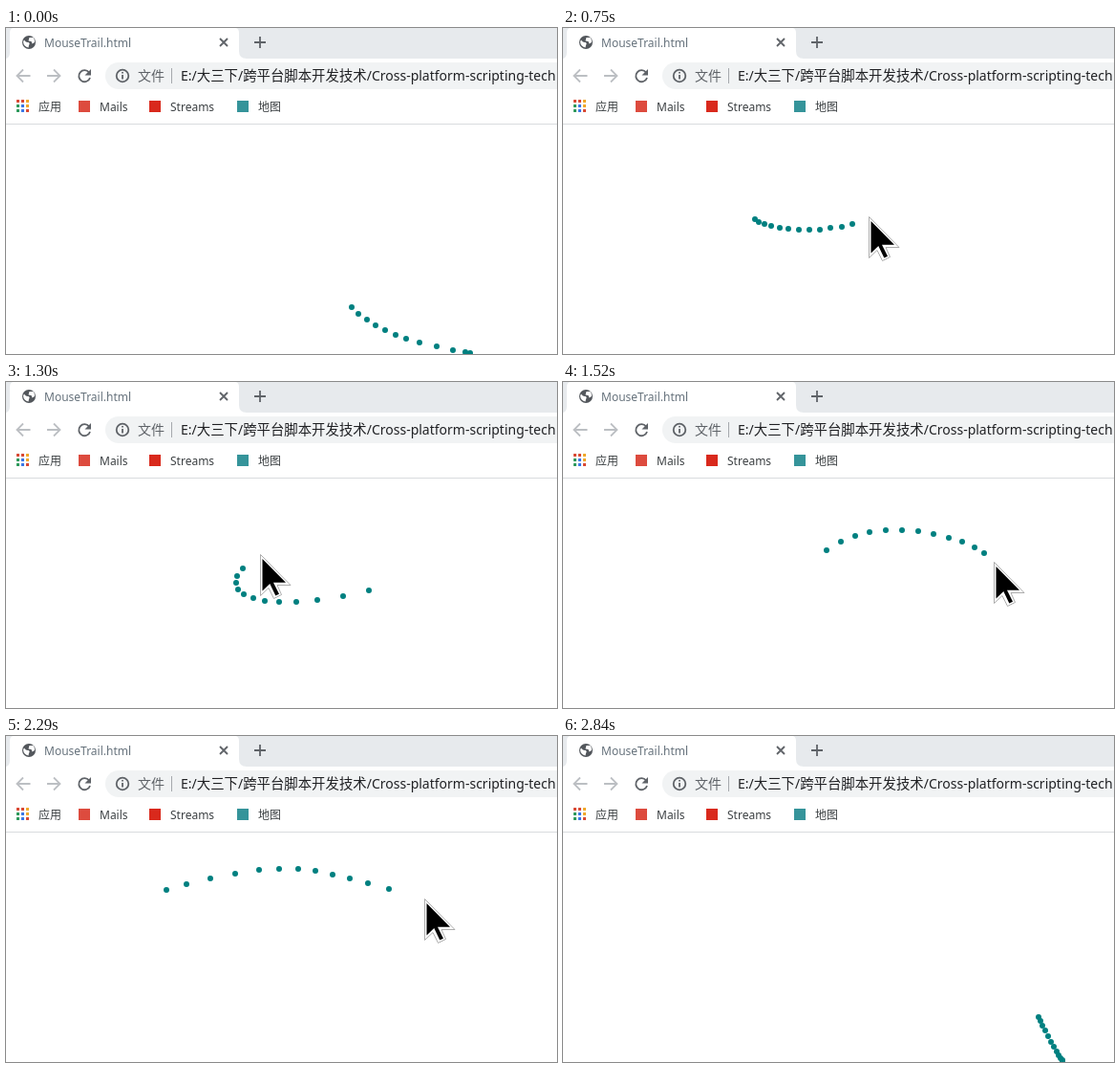
An HTML page for the animation above (3270 ms loop, 577 px wide and 341 px high).

```html
<!DOCTYPE html>
<html lang="zh">
<head>
<meta charset="utf-8">
<title>Mouse trail</title>
<style>
  html, body { margin: 0; width: 100%; height: 100%; overflow: hidden; background: #fff; }
  svg { display: block; width: 100%; height: 100%; }
  text { font: 12px "Noto Sans", "Noto Sans CJK SC", "Noto Sans CJK", sans-serif; fill: #3c4043; }
  .tab { fill: #66727c; }
  .url { font-size: 14px; fill: #202124; }
  .url tspan { font-size: 14.4px; }
  .scheme { font-size: 14px; fill: #5f6368; }
  .icon { fill: none; stroke: #5f6368; stroke-width: 1.8; }
  .off { stroke: #bcbfc3; }
  #trail { fill: #008080; }
</style>
</head>
<body>
<svg viewBox="0 0 577 341" xmlns="http://www.w3.org/2000/svg">
  <rect width="577" height="341" fill="#fff"/>

  <!-- tab strip -->
  <rect width="577" height="32" fill="#e7eaed"/>
  <path d="M0 32Q4 31 4 25V5Q4 1 7 0H241Q244 1 244 5V24Q244 32 252 32Z" fill="#fff"/>
  <circle cx="24" cy="15" r="7" fill="#53575c"/>
  <path d="M19 12.500q2 3 4.500 2.500q2 1 .5 3l-.5 2.500q-5-1-5.500-6zM24.500 10h4q2 2 1.500 5l-2.500 1.500l-1-2.500l-3-.5z" fill="#fff"/>
  <text class="tab" x="40" y="20">MouseTrail.html</text>
  <path class="icon" d="M224 11l8 8M232 11l-8 8"/>
  <path class="icon" d="M260 15h12M266 9v12"/>

  <!-- toolbar -->
  <path class="icon off" d="M25.500 50H12M18 43.500L11.500 50L18 56.500"/>
  <path class="icon off" d="M43 50H56.500M50 43.500L56.500 50L50 56.500"/>
  <path class="icon" d="M87 46.500A6 6 0 1 0 88 52"/>
  <path d="M89 43v6.500h-6.500z" fill="#5f6368"/>
  <rect x="104" y="36" width="500" height="28" rx="14" fill="#f1f3f4"/>
  <circle class="icon" cx="122" cy="50" r="6.300"/>
  <path class="icon" d="M122 49v4.500M122 46v1.600"/>
  <text class="scheme" x="138" y="55">文件</text>
  <path d="M173.500 42v16" stroke="#a6a9ad"/>
  <text class="url" x="183" y="55">E:/<tspan>大三下</tspan>/<tspan>跨平台脚本开发技术</tspan>/Cross-platform-scripting-tech</text>

  <!-- bookmarks -->
  <g id="apps"></g>
  <text x="34" y="87">应用</text>
  <rect x="76" y="76" width="12" height="12" fill="#dd4b3e"/>
  <text x="98" y="87">Mails</text>
  <rect x="150" y="76" width="12" height="12" fill="#d9291c"/>
  <text x="172" y="87">Streams</text>
  <rect x="242" y="76" width="12" height="12" fill="#35949a"/>
  <text x="264" y="87">地图</text>
  <path d="M0 100.500H577" stroke="#d9dbde"/>

  <g id="trail"></g>
  <g id="cursor">
    <path d="M.5 .5V43.500L9 35.500L14.500 46.500L22.500 42.500L18 32.500H32Z" fill="#fff" stroke="#999" stroke-width=".8"/>
    <path d="M2.500 5V38.500L10.300 31L16.300 43.500L20 41.700L14 29.700H27Z"/>
  </g>
</svg>
<script>
const LOOP = 3270, FRAME_MS = 110, PHASE_MS = 35, LAST = 26;
const DOTS = 12, SAMPLES_PER_FRAME = 6.6, CURSOR_LEAD = 1.5;

// Key points of the mouse path, one swing per line: [sample, x, y]
const keys = [
  [-11, 486, 340], [-6, 419, 325], [0, 362, 292], [9, 339, 213], [14, 278, 188], [21, 236, 171], [28, 206, 171],
  [35, 201, 200], [46, 303, 205], [54, 400, 160], [62, 420, 172],
  [68, 380, 218], [70, 326, 228], [73, 271, 229], [79, 248, 195],
  [82, 291, 167], [96, 454, 205],
  [101, 406, 242], [106, 321, 257], [112, 193, 240], [121, 134, 198],
  [128, 168, 161], [132, 265, 140], [139, 401, 160], [142, 474, 182],
  [154, 490, 269], [161, 498, 294], [172, 523, 340]
];

const byId = id => document.getElementById(id);
const svgEl = (parent, name, attrs) => {
  const el = document.createElementNS('http://www.w3.org/2000/svg', name);
  for (const key in attrs) el.setAttribute(key, attrs[key]);
  return parent.appendChild(el);
};

// Speed along one axis at a key point; the path starts and ends at rest
function speed(i, axis) {
  if (i === 0 || i === keys.length - 1) return 0;
  const [a, b, c] = keys.slice(i - 1, i + 2);
  const before = b[0] - a[0], after = c[0] - b[0];
  return ((b[axis] - a[axis]) / before * after + (c[axis] - b[axis]) / after * before) / (before + after);
}

// Cubic Hermite position, on whole pixels
function mouseAt(sample) {
  const s = Math.min(sample, keys.at(-1)[0]);
  const j = Math.max(1, keys.findIndex(key => key[0] >= s));
  const a = keys[j - 1], b = keys[j];
  const span = b[0] - a[0], t = (s - a[0]) / span, u = 1 - t;
  return [1, 2].map(axis => Math.round(
    a[axis] + (b[axis] - a[axis]) * t * t * (3 - 2 * t)
    + span * t * u * (u * speed(j - 1, axis) - t * speed(j, axis))));
}

const red = '#d94a35', green = '#2f9a5c', blue = '#3b78e7', yellow = '#f0a92c';
[red, red, yellow, green, blue, yellow, green, blue, red].forEach((fill, i) =>
  svgEl(byId('apps'), 'rect', { x: 11 + i % 3 * 5, y: 75 + Math.floor(i / 3) * 5, width: 3, height: 3, fill }));

const dots = Array.from({ length: DOTS }, () => svgEl(byId('trail'), 'circle', { r: 3 }));
const cursor = byId('cursor');

function draw(frame) {
  const head = Math.round(frame * SAMPLES_PER_FRAME);
  dots.forEach((dot, i) => {
    const [x, y] = mouseAt(head - i);
    dot.setAttribute('cx', x);
    dot.setAttribute('cy', y);
  });
  const [x, y] = mouseAt(head + CURSOR_LEAD);
  cursor.setAttribute('transform', `translate(${x - 1} ${y - 1})`);
  cursor.setAttribute('visibility', frame > 0 && frame < LAST - 1 ? 'visible' : 'hidden');
}

const start = performance.now();
function tick() {
  const t = (performance.now() - start) % LOOP;
  draw(Math.min(LAST, Math.floor((t + PHASE_MS) / FRAME_MS)));
  requestAnimationFrame(tick);
}
tick();
</script>
</body>
</html>
```
